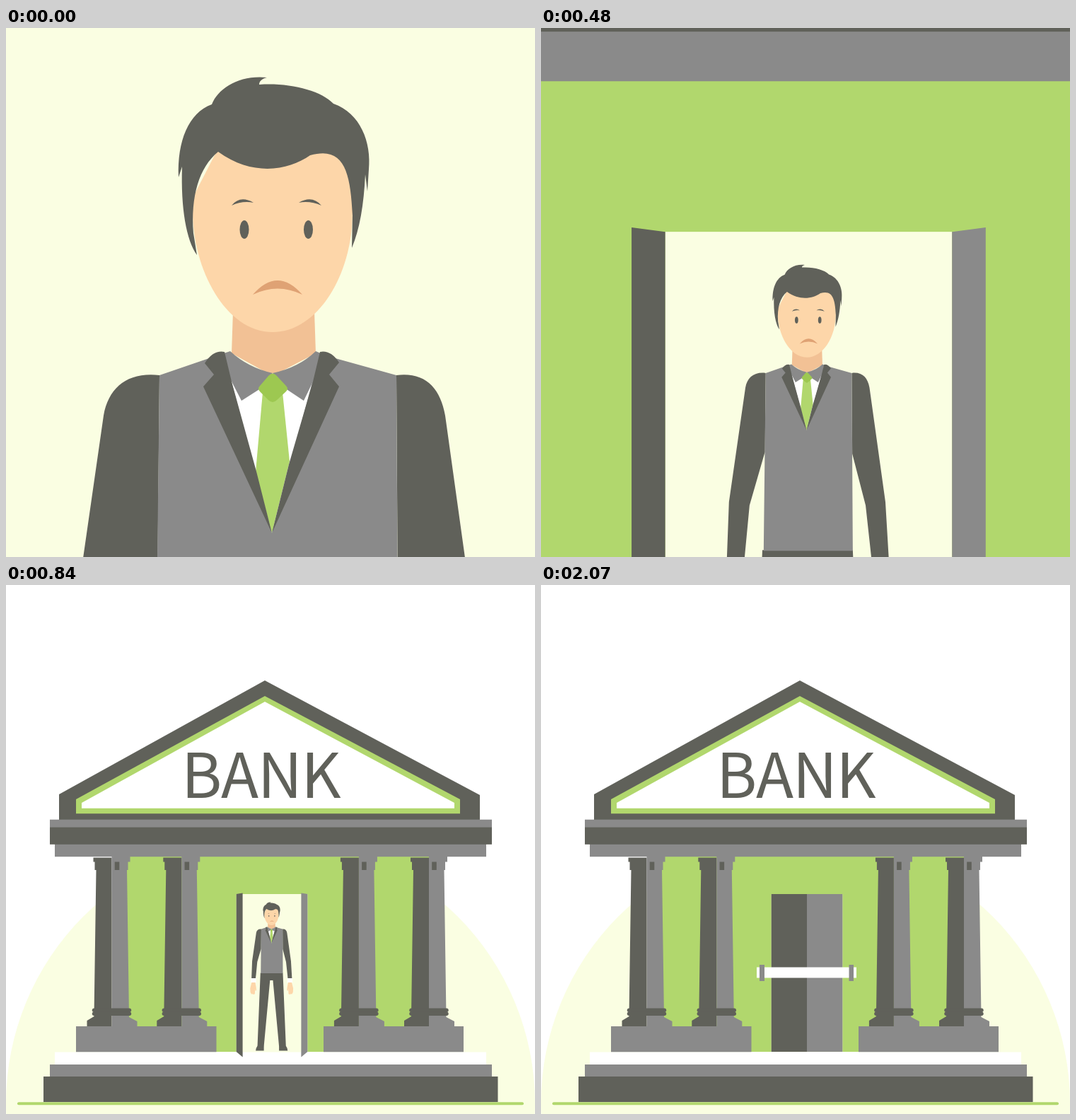
Recreate the animation shown at these times as an HTML page with a canvas. Size 748 by 748 pixels, loop 3.39 s.

```html
<!DOCTYPE html>
<html lang="en">
<head>
<meta charset="utf-8">
<title>Bank</title>
<style>
html, body { margin: 0; width: 100%; height: 100%; overflow: hidden; background: #fff; }
canvas { display: block; }
</style>
</head>
<body>
<canvas id="stage" width="748" height="748"></canvas>
<script>
const ctx = document.getElementById('stage').getContext('2d');
const LOOP = 3390, STEP = 30;
const DARK = '#60615a', GRAY = '#8a8a8a', GREEN = '#b1d76d', KNOT = '#9dc851';
const CREAM = '#fafee2', SKIN = '#fdd6a9', NECK = '#f2c195', MOUTH = '#dfa274', WHITE = '#fff';

const ZOOM = { x: 375.2, y: 486.1, start: 11.1, end: 634 };
const DOOR = { left: 325.7, right: 426.3, top: 437, bottom: 660, ajar: 11.8, from: 660, to: 1200 };
const BAR = { x: 420.25, y: 553.25, left: -2.25, width: 15, bottom: 25.75, length: 141 };

const clamp = v => Math.min(1, Math.max(0, v));
const span = (t, a, b) => clamp((t - a) / (b - a));

function rect(color, x1, y1, x2, y2) {
  ctx.fillStyle = color;
  ctx.fillRect(x1, y1, x2 - x1, y2 - y1);
}

function poly(color, ...pts) {
  ctx.fillStyle = color;
  ctx.beginPath();
  for (let i = 0; i < pts.length; i += 2) ctx.lineTo(pts[i], pts[i + 1]);
  ctx.fill();
}

function oval(color, x, y, rx, ry) {
  ctx.fillStyle = color;
  ctx.beginPath();
  ctx.ellipse(x, y, rx, ry, 0, 0, Math.PI * 2);
  ctx.fill();
}

function line(color, width, x1, y1, x2, y2) {
  ctx.strokeStyle = color;
  ctx.lineWidth = width;
  ctx.lineCap = 'round';
  ctx.beginPath();
  ctx.moveTo(x1, y1);
  ctx.lineTo(x2, y2);
  ctx.stroke();
}

// Man, drawn at close-up size, from back to front
const man = [
  [DARK, 'M204 1180H556L604 2330H496L400 1295H354L258 2330H157Z'],
  [DARK, 'M157 2325H258V2400H130Q130 2360 157 2325ZM496 2325H604Q631 2360 631 2400H496Z'],
  [WHITE, 'M55 1258H135V1330H55ZM626 1258H706V1330H626Z'],
  [SKIN, 'M66 1329H122L136 1400L141 1450L126 1462L120 1425L116 1510L98 1518L80 1508L62 1512L46 1480L43 1420Z'],
  [SKIN, 'M695 1329H639L625 1400L620 1450L635 1462L641 1425L645 1510L663 1518L681 1508L699 1512L715 1480L718 1420Z'],
  [DARK, 'M217 491C172 486 145 508 138 548L74 993L64 1262H128L135 1207L154 1006L214 798Z'],
  [DARK, 'M552 491C592 486 614 508 621 548L683 993L699 1262H633L628 1207L606 1006L554 805Z'],
  [GRAY, 'M217 491L290 466L376 500L462 466L552 491L556 1183H209Z'],
  [NECK, 'M321 400H436L438 460L377 492L319 460Z'],
  [WHITE, 'M316 490L377 488L436 490L376 714Z'],
  [GREEN, 'M363 515H391L401 613L376 714L353 628Z'],
  [GRAY, 'M308 460L317 457Q342 480 377 488L358 511L333 527L317 496Z'],
  [GRAY, 'M445 460L438 457Q414 480 377 488L397 511L421 527L436 496Z'],
  [DARK, 'M309 458Q293 455 281 474L294 490L279 507L376 714L354 627L319 500Z'],
  [DARK, 'M444 458Q459 455 471 473L457 490L471 507L376 714L400 617L434 500Z'],
  [KNOT, 'M371 492Q377 485 383 492L396 506Q400 510 396 514L383 526Q377 532 371 526L359 514Q355 510 359 506Z'],
  [SKIN, 'M264 260C264 340 310 430 377 430C440 430 490 350 490 260V200L465 170H300L264 240Z'],
  [DARK, `M270 321C255 300 247 255 249 196L244 211C242 160 258 120 291 108C300 85 330 66 369 70
    C361 72 358 76 358 80C400 77 445 88 463 107C501 120 517 162 513 200L511 231L508 207
    C506 250 500 285 489 311L490 265C487 205 479 166 430 180C400 201 350 211 300 175
    C273 197 261 238 265 290Z`],
  [DARK, 'M319 251Q331 236 350 247Q334 244 319 251ZM414 247Q433 236 446 251Q430 244 414 247Z'],
  [MOUTH, 'M349 377Q384 337 419 377Q384 360 349 377Z']
].map(([color, d]) => [color, new Path2D(d)]);

function drawMan() {
  ctx.save();
  ctx.translate(ZOOM.x, ZOOM.y);
  ctx.scale(1 / ZOOM.start, 1 / ZOOM.start);
  ctx.translate(-ZOOM.x, -ZOOM.y);
  for (const [color, path] of man) {
    ctx.fillStyle = color;
    ctx.fill(path);
  }
  oval(DARK, 337, 285, 6.5, 13);
  oval(DARK, 427.5, 285, 6.5, 13);
  ctx.restore();
}

function drawDoor(t) {
  const q = span(t, DOOR.from, DOOR.to);
  const swing = Math.sqrt(1 - q * q);
  const half = (DOOR.right - DOOR.left) / 2;
  const reach = q * (half + DOOR.ajar) - DOOR.ajar;
  const panel = (color, hinge, free) => poly(color,
    hinge, DOOR.top, free, DOOR.top - 1.5 * swing,
    free, DOOR.bottom + 8 * swing, hinge, DOOR.bottom);
  panel(DARK, DOOR.left, DOOR.left + reach);
  panel(GRAY, DOOR.right, DOOR.right - reach);
}

function drawColumn(x) {
  ctx.save();
  ctx.translate(x, 0);
  poly(DARK, 0, 385.5, -26, 385.5, -26, 391.5, -24, 391.5, -24, 403, -22, 403,
    -25, 610, -35, 616, -35, 625, 0, 625);
  poly(GRAY, 0, 384, 26, 384, 26, 391.5, 23, 391.5, 23, 403, 21.5, 403,
    24.5, 611, 36, 617, 36, 625, 0, 625);
  rect(DARK, 4.2, 391.5, 10.8, 403);
  line(DARK, 5.4, -25, 601.2, 25, 601.2);
  line(DARK, 5.4, -25, 606.2, 25, 606.2);
  ctx.restore();
}

function drawRoof() {
  poly(DARK, 75, 333, 75, 296, 366, 135, 670, 297, 670, 333);
  poly(GREEN, 99, 323.3, 99, 303, 366, 157, 642, 303, 642, 323.3);
  poly(WHITE, 107, 315.7, 107, 308, 366, 165, 634, 308, 634, 315.7);
  rect(GRAY, 62, 331.7, 687, 343);
  rect(GRAY, 69, 366, 679, 384.2);
  rect(DARK, 62, 342.6, 687, 366.8);
  ctx.fillStyle = DARK;
  ctx.font = '87.3px "Noto Sans CJK JP", "Noto Sans CJK SC", "Open Sans", sans-serif';
  ctx.letterSpacing = '-1.4px';
  ctx.fillText('BANK', 248, 301.3);
}

function drawBank(t) {
  oval(CREAM, 374, 733, 374, 374);
  rect(GREEN, 150, 380, 600, 660);
  rect(CREAM, DOOR.left, DOOR.top, DOOR.right, DOOR.bottom);
  if (t < DOOR.to) drawMan();
  [149.5, 248.3, 498.9, 598].forEach(drawColumn);
  rect(GRAY, 99, 624, 297.5, 660.5);
  rect(GRAY, 449, 624, 647, 660.5);
  drawRoof();
  rect(WHITE, 69, 660.5, 679, 678);
  rect(GRAY, 62, 678, 687, 695.5);
  rect(DARK, 53, 695, 695.5, 731);
  line(GREEN, 4, 18, 733.3, 730, 733.3);
  drawDoor(t);
}

function drawBar(t) {
  const grown = span(t, 1200, 1400), turned = span(t, 1448, 2070);
  if (!grown) return;
  ctx.save();
  ctx.translate(BAR.x, BAR.y);
  ctx.rotate(-turned * Math.PI / 2);
  const top = BAR.bottom - BAR.length * grown;
  rect(WHITE, BAR.left, top, BAR.left + BAR.width, BAR.bottom);
  ctx.restore();
  if (turned === 1) {
    rect(GRAY, 309, 537, 316, 560);
    rect(GRAY, 435.5, 537, 442, 560);
  }
}

function zoomAt(t) {
  const u = clamp(t / ZOOM.end);
  const p = clamp(u * (0.5953 + 0.5215 * u - 0.1147 * u * u));
  return ZOOM.start + (1 - ZOOM.start) * p;
}

function draw(t) {
  const s = zoomAt(t);
  ctx.setTransform(1, 0, 0, 1, 0, 0);
  rect(WHITE, 0, 0, 748, 748);
  ctx.translate(ZOOM.x, ZOOM.y);
  ctx.scale(s, s);
  ctx.translate(-ZOOM.x, -ZOOM.y);
  drawBank(t);
  drawBar(t);
}

function tick() {
  const t = performance.now() % LOOP;
  draw(Math.floor(t / STEP) * STEP);
  requestAnimationFrame(tick);
}
tick();
</script>
</body>
</html>
```
